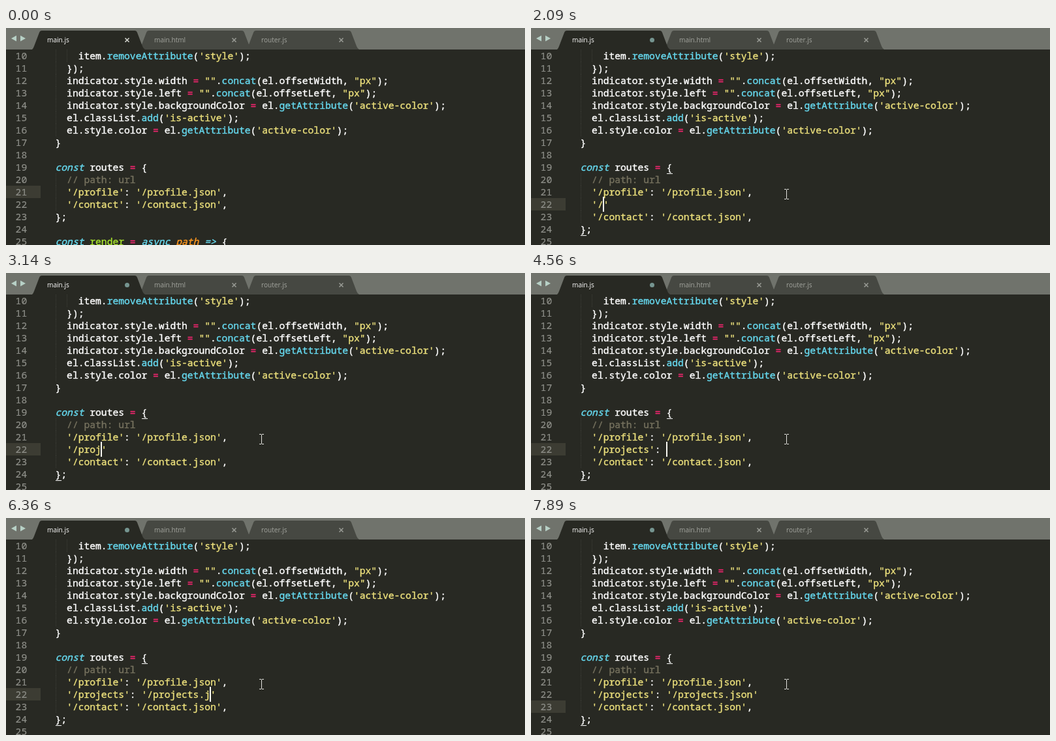
An HTML page with a canvas that plays this animation: 795x333 px, repeating every 8 s.

```html
<!DOCTYPE html>
<html lang="en">
<head>
<meta charset="utf-8">
<title>Code editor</title>
<style>
html, body { margin: 0; width: 100%; height: 100%; overflow: hidden; background: #282923; }
canvas { display: block; }
</style>
</head>
<body>
<canvas id="stage" width="795" height="333"></canvas>
<script>
const ctx = document.getElementById('stage').getContext('2d');
const LOOP = 8000, CHAR = 8.797, ROW = 19, TOP = 33, LEFT = 57;
const MONO = '14.66px "Noto Sans Mono", "DejaVu Sans Mono", monospace';
const UI = '10.1px "Open Sans", "Noto Sans", sans-serif';
const WHITE = '#ffffff', BLUE = '#66d9ef';

const code = `      item.removeAttribute('style');
    });
    indicator.style.width = "".concat(el.offsetWidth, "px");
    indicator.style.left = "".concat(el.offsetLeft, "px");
    indicator.style.backgroundColor = el.getAttribute('active-color');
    el.classList.add('is-active');
    el.style.color = el.getAttribute('active-color');
  }

  const routes = {
    // path: url
    '/profile': '/profile.json',
    '/contact': '/contact.json',
  };

  const render = async path => {`.split('\n');

// Token classes in the order of the groups in TOKEN
const TOKEN = /('[^']*'|"[^"]*")|(\/\/.*)|(const|async|=>)|(=)|(\w+(?=\())|(render)|(path)|[^\s\w]|\w+/g;
const STYLES = [['#ece07c'], ['#75715e'], [BLUE, 'italic '], ['#f92672'], [BLUE], ['#a6e22e'], ['#fd971f', 'italic ']];

// [time, text of the new line, characters after the caret]
const edits = [
  [1400, '', 0], [1810, "''", 1], [2090, "'/'", 1],
  [2450, "'/p'", 1], [2560, "'/pr'", 1], [2680, "'/pro'", 1], [3110, "'/proj'", 1],
  [3190, "'/proje'", 1], [3370, "'/projec'", 1], [3520, "'/project'", 1],
  [3610, "'/projects'", 1], [3700, "'/projects'", 0],
  [4270, "'/projects':", 0], [4560, "'/projects': ", 0]
];
const KEY = "'/projects': ";
[[4740, ''], [4920, '/'], [5300, '/p'], [5400, '/pr'], [5480, '/pro'], [5560, '/proj'],
 [5660, '/proje'], [5840, '/projec'], [5990, '/project'], [6080, '/projects'],
 [6170, '/projects.'], [6360, '/projects.j'], [6490, '/projects.js'],
 [6570, '/projects.jso'], [6640, '/projects.json']
].forEach(([t, s]) => edits.push([t, `${KEY}'${s}'`, 1]));
edits.push([7020, `${KEY}'/projects.json'`, 0]);

const words = ['projects', 'profile', 'prototype', 'path', 'json'];
const popups = [[2500, 3110], [5350, 6080], [6410, 6640]];
const blinks = [[1250, 1250, 1400], [1660, 1660, 1810], [4110, 4210, 4270], [7710, 7890, 8000]]; // fade, off, on
const pointerPath = [
  [30, 681, 313], [75, 560, 272], [120, 445, 242], [160, 388, 232],
  [360, 388, 237], [405, 389, 243], [450, 391, 248],
  [650, 393, 250], [720, 392, 253], [800, 391, 255]
];

const latest = (list, t) => list.filter(e => e[0] <= t).pop();
const colX = col => LEFT + CHAR * col;
const rowY = row => TOP + ROW * row;

function rect(color, x, y, w, h) {
  ctx.fillStyle = color;
  ctx.fillRect(x, y, w, h);
}

// A thin outline gives the letters their sturdier weight
function mono(s, x, y, color, style = '', outline = 0.4) {
  ctx.font = style + MONO;
  ctx.fillStyle = ctx.strokeStyle = color;
  ctx.lineWidth = outline;
  ctx.lineJoin = 'round';
  [...s].forEach((c, i) => {
    ctx.fillText(c, x + i * CHAR, y);
    ctx.strokeText(c, x + i * CHAR, y);
  });
}

function drawLine(s, row) {
  const y = rowY(row), indent = s.search(/\S|$/);
  for (let col = 2; col < indent; col += 2)
    for (let dy = 0; dy < ROW; dy += 2) rect('#3d3e37', Math.round(colX(col)) + 1, y + dy, 1, 1);
  for (const m of s.matchAll(TOKEN)) {
    const group = m.slice(1).findIndex(g => g !== undefined);
    const [color, style] = STYLES[group] || [WHITE];
    mono(m[0], colX(m.index) + 0.9, y + 15, color, style);
  }
}

function drawTab(i, name, dirty) {
  const x = 40 + i * 164, active = i === 0;
  ctx.beginPath();
  ctx.moveTo(x, TOP);
  ctx.quadraticCurveTo(x + 2, 31, x + 3, 28);
  ctx.lineTo(x + 11, 7);
  ctx.quadraticCurveTo(x + 12, 4, x + 15, 4);
  ctx.lineTo(x + 157, 4);
  ctx.quadraticCurveTo(x + 160, 4, x + 161, 7);
  ctx.lineTo(x + 169, 28);
  ctx.quadraticCurveTo(x + 170, 31, x + 173, TOP);
  ctx.fillStyle = active ? '#282923' : '#464842';
  ctx.fill();
  ctx.font = UI;
  ctx.fillStyle = active ? WHITE : '#a3a59f';
  ctx.fillText(name, x + 23, 22);
  ctx.beginPath();
  if (dirty) {
    ctx.arc(x + 145.5, 18.5, 3.5, 0, 7);
    ctx.fillStyle = '#759590';
    ctx.fill();
  } else {
    ctx.moveTo(x + 142.5, 15.5); ctx.lineTo(x + 148.5, 21.5);
    ctx.moveTo(x + 148.5, 15.5); ctx.lineTo(x + 142.5, 21.5);
    ctx.strokeStyle = active ? '#d5d6d0' : '#989a94';
    ctx.lineWidth = 1.6;
    ctx.stroke();
  }
}

function drawArrow(x, dir) {
  ctx.beginPath();
  ctx.moveTo(x - 4 * dir, 11.5);
  ctx.lineTo(x + 4 * dir, 16);
  ctx.lineTo(x - 4 * dir, 20.5);
  ctx.fillStyle = '#b7d0c6';
  ctx.fill();
}

function drawBar(dirty) {
  rect('#70736c', 0, 0, 795, TOP);
  drawArrow(12, -1);
  drawArrow(26, 1);
  drawTab(2, 'router.js');
  drawTab(1, 'main.html');
  drawTab(0, 'main.js', dirty);
}

function drawPopup(text, t) {
  const prefix = text.match(/(\w*)'$/)[1];
  const items = words.filter(w => w !== prefix && w.startsWith(prefix) && (t > 4000 || w !== 'projects'));
  if (!items.length) return;
  const x = Math.round(colX(3 + text.length - prefix.length)) - 5, y = rowY(13) + 1;
  rect('#4a4b46', x, y, 300, 3 + ROW * items.length);
  rect('#5a5b56', x, y, 300, 22);
  items.forEach((word, i) => {
    const base = y + 15 + i * ROW, n = prefix.length;
    mono(prefix, x + 6, base, WHITE, 'bold ');
    mono(word.slice(n), x + 6 + n * CHAR, base, WHITE);
  });
}

function drawCaret(row, col, t) {
  const blink = blinks.find(([fade, , on]) => t >= fade && t < on);
  ctx.globalAlpha = !blink ? 1 : t < blink[1] ? 0.5 * (blink[1] - t) / (blink[1] - blink[0]) + 0.2 : 0;
  rect('#f8f8f2', Math.round(colX(col)), rowY(row) - 2, 2, 23);
  ctx.globalAlpha = 1;
}

function drawPointer([, x, y]) {
  rect('#e4e4e0', x, y - 7, 1, 14);
  for (const dy of [-8, 7]) {
    rect('#e4e4e0', x - 3, y + dy, 3, 1);
    rect('#e4e4e0', x + 1, y + dy, 3, 1);
  }
}

function draw(t) {
  const edit = latest(edits, t), clicked = t >= 900, moved = t >= 7330;
  const lines = code.slice();
  if (edit) lines.splice(12, 0, '    ' + edit[1]);

  rect('#282923', 0, 0, 795, 333);
  const row = moved ? 13 : edit ? 12 : 11;
  rect('#3c3c33', 0, rowY(row), 53, ROW);
  for (let i = 0; i < 16; i++) {
    mono(String(10 + i), 14.6, rowY(i) + 15, '#8f908a', '', 0.2);
    drawLine(lines[i], i);
  }
  if (clicked) {
    rect(WHITE, Math.round(colX(17)) + 1, rowY(10), 9, 1);
    rect(WHITE, Math.round(colX(2)) + 1, rowY(edit ? 15 : 14), 9, 1);
    const col = moved ? 0 : edit ? 4 + edit[1].length - edit[2] : 32;
    drawCaret(row, col, t);
  }
  if (popups.some(([from, to]) => t >= from && t < to)) drawPopup(edit[1], t);
  drawBar(!!edit);
  const pointer = latest(pointerPath, t);
  if (pointer) drawPointer(pointer);
}

function frame() {
  draw(performance.now() % LOOP);
  requestAnimationFrame(frame);
}
frame();
</script>
</body>
</html>
```
